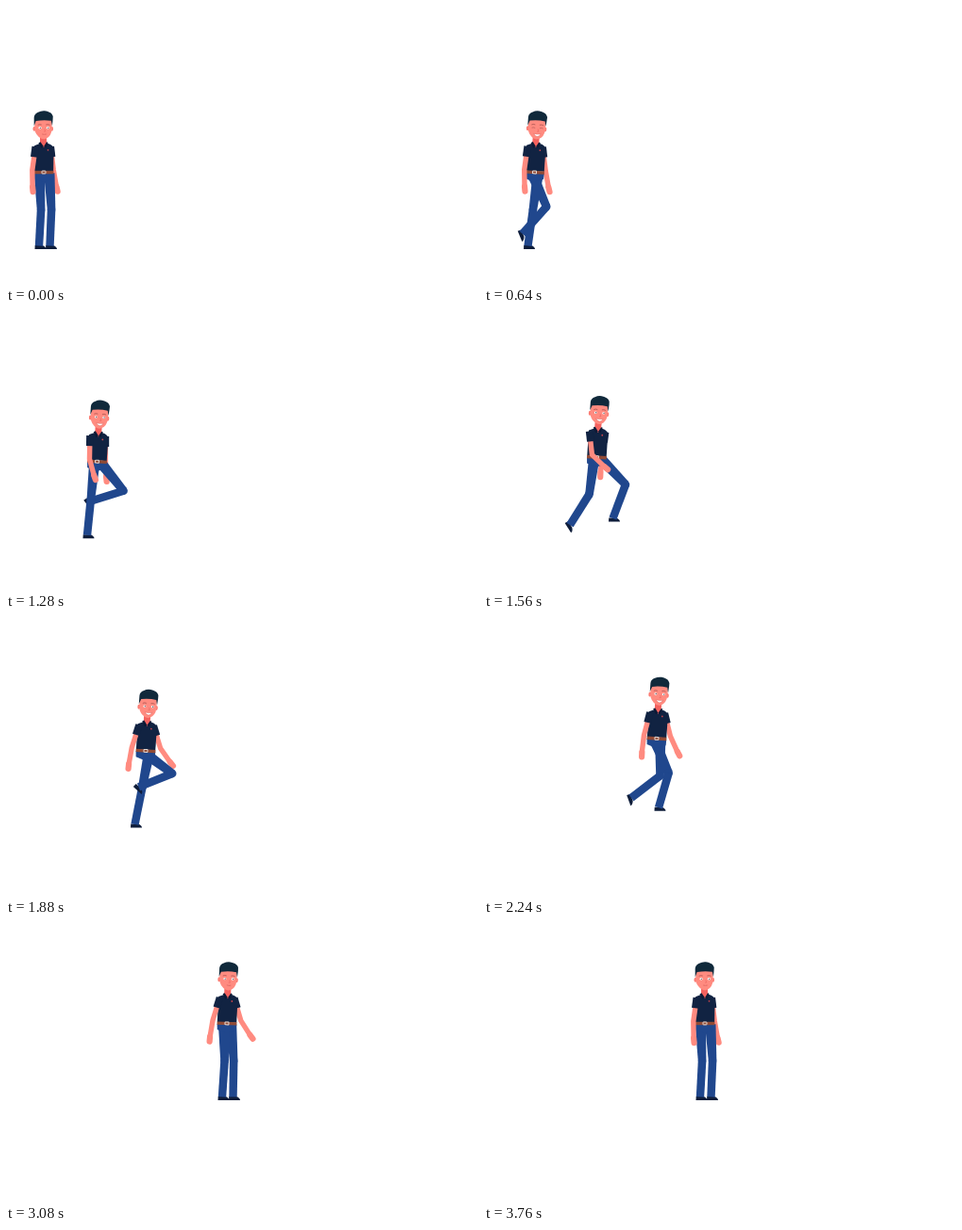
An HTML page for the animation above (3800 ms loop, 500x295 px).

```html
<!DOCTYPE html>
<html lang="en">
<head>
<meta charset="utf-8">
<title>Climbing steps</title>
<style>
  html, body { margin: 0; width: 100%; height: 100%; overflow: hidden; background: #fff; }
  svg { display: block; width: 500px; height: 295px; }
</style>
</head>
<body>
<svg viewBox="0 0 500 295">
  <g id="armR"></g>
  <g id="legR"></g>
  <g id="legL"></g>
  <g id="body">
    <path d="M-10.3 1H10.3L10 7L1.5 10H-1.5L-10 7Z" fill="#20478d"/>
    <path d="M-5 -30L-10 -28L-10.2 -1H10.2L10.5 -25Q10 -29 4 -30.5Z" fill="#112342"/>
    <rect x="-10.4" y="-1.5" width="20.8" height="3.4" fill="#914a35"/>
    <rect x="-2" y="-1.3" width="4" height="2.9" rx=".6" fill="#914a35" stroke="#e3dcd8"/>
    <circle cx="4.5" cy="-23.5" r=".9" fill="#c4434b"/>
    <g id="head">
      <path d="M-4 -38H3V-29.5L0 -26L-4 -30Z" fill="#f4625f"/>
      <path d="M-5.5 -31L-3.5 -32L0 -27L-2.5 -25.5ZM4.5 -31.5L3 -32L0 -27L2.5 -26Z" fill="#0c1a36"/>
      <ellipse cx="-10" cy="-46" rx="1.5" ry="2.5" fill="#fb7b72"/>
      <ellipse cx="8.7" cy="-46" rx="1.3" ry="2.5" fill="#fb7b72"/>
      <path d="M-9.7 -56H8.5V-45Q8 -38 2.5 -35.5Q0 -34.4 -2.5 -35.5Q-9 -39 -9.7 -46Z" fill="#ff8b80"/>
      <path d="M-10.3 -49V-58Q-10 -62 -6 -63.5Q-3 -65.3 1 -65Q7 -64 8.6 -61.5Q10.3 -60 9.6 -56L9 -49L7.8 -54.5Q0 -55.8 -8.3 -54.2Z" fill="#10293b"/>
      <path d="M-6.3 -50Q-4.5 -51.2 -2.3 -50.3M2.3 -50.3Q4.5 -51.2 6.5 -50" fill="none" stroke="#a0504c" stroke-width=".7"/>
      <g id="open">
        <ellipse cx="-4" cy="-47" rx="1.5" ry="1.2" fill="#fff"/>
        <ellipse cx="4.4" cy="-47" rx="1.5" ry="1.2" fill="#fff"/>
        <circle cx="-3.7" cy="-47" r=".65" fill="#4b4650"/>
        <circle cx="4.7" cy="-47" r=".65" fill="#4b4650"/>
      </g>
      <path id="shut" d="M-5.8 -46.8Q-4 -47.6 -2.2 -46.8M2.6 -46.8Q4.4 -47.6 6.2 -46.8" fill="none" stroke="#b85a56" stroke-width=".7"/>
      <path d="M.8 -46L1.7 -43.2H0" fill="none" stroke="#ee6a63" stroke-width=".7"/>
      <path id="mouth" stroke="#de645f" stroke-width=".5" fill="#fff"/>
    </g>
  </g>
  <g id="armL"></g>
</svg>
<script>
const LOOP = 3800, TICK = 40, STRIDE = 560, RISE = 17.75, BONE = 38.5, RAD = Math.PI / 180;
const SKIN = '#ff8b80', SHIRT = '#112342', JEANS = '#20478d', SHOE = '#0e1d3a';
const HOME = { L: 35, R: 46.5 }, GROUND = 254.5;

// [foot, lift time, landing time, landing x]
const steps = [
  ['L', 500, 920, 86], ['R', 860, 1480, 136.5], ['L', 1420, 2040, 185],
  ['R', 1980, 2580, 240.5], ['L', 2520, 3000, 229]
];
// [time, x] of the belt
const walkPath = [[400, 40], [640, 53.5], [1280, 96.5], [1880, 148], [2600, 216], [2960, 234]];

const $ = id => document.getElementById(id);
const f = n => n.toFixed(2);
const pt = p => f(p[0]) + ' ' + f(p[1]);
const mix = (a, b, u) => a + (b - a) * u;
const part = (t, a, b) => Math.min(1, Math.max(0, (t - a) / (b - a)));
const ease = (t, a, b) => { const u = part(t, a, b); return u * u * (3 - 2 * u); };
const polar = (p, len, deg) => [p[0] + len * Math.sin(deg * RAD), p[1] + len * Math.cos(deg * RAD)];

// smooth curve through the path, at rest at both ends
function beltX(t) {
  const last = walkPath.length - 1;
  if (t <= walkPath[0][0]) return walkPath[0][1];
  if (t >= walkPath[last][0]) return walkPath[last][1];
  let i = 0;
  while (walkPath[i + 1][0] <= t) i++;
  const [t0, a] = walkPath[i], [t1, b] = walkPath[i + 1], h = t1 - t0, u = (t - t0) / h;
  const slope = k => k === 0 || k === last ? 0 :
    (walkPath[k + 1][1] - walkPath[k - 1][1]) / (walkPath[k + 1][0] - walkPath[k - 1][0]);
  const m = slope(i) * h, n = slope(i + 1) * h, d = b - a;
  return a + u * (m + u * (3 * d - 2 * m - n + u * (m + n - 2 * d)));
}

function beltY(t) {
  let y = 176.3;
  for (let i = 0; i < 4; i++) y -= RISE * ease(t, 880 + STRIDE * i, 1240 + STRIDE * i);
  return y;
}

// ankle place and shoe tilt: the heel peels off, then the foot swings up and over
function footPose(side, t) {
  let x = HOME[side], y = GROUND, tilt = 0;
  steps.forEach(([foot, lift, land, toX], i) => {
    if (foot !== side || t < lift) return;
    const p = part(t, lift, land), toY = GROUND - RISE * Math.min(i + 1, 4);
    x = mix(x, toX, p * p);
    y = mix(y, toY, p) - 31 * Math.sin(Math.PI * p ** 2.4);
    tilt = 70 * Math.sin(Math.PI * p ** .8);
  });
  return { x, y, tilt };
}

function taper(a, b, wa, wb) {
  const d = Math.hypot(b[0] - a[0], b[1] - a[1]) || 1;
  const n = [(a[1] - b[1]) / d / 2, (b[0] - a[0]) / d / 2];
  const edge = (p, w) => pt([p[0] + n[0] * w, p[1] + n[1] * w]);
  return `<path d="M${edge(a, wa)}L${edge(b, wb)}L${edge(b, -wb)}L${edge(a, -wa)}Z" fill="${JEANS}"/>`;
}

function leg(hip, { x, y, tilt }) {
  const dx = x - hip[0], dy = y - hip[1], dist = Math.hypot(dx, dy);
  const bend = Math.sqrt(Math.max(0, BONE * BONE - dist * dist / 4)) / dist;
  const knee = [hip[0] + dx / 2 + dy * bend, hip[1] + dy / 2 - dx * bend];
  const ankle = [x, y];
  return `<path transform="translate(${pt(ankle)}) rotate(${f(tilt)})" d="M-4.3 -.5H3.5Q7.3 1 7.5 3.5H-4.5Z" fill="${SHOE}"/>` +
    taper(hip, knee, 11.4, 8.6) +
    `<circle cx="${f(knee[0])}" cy="${f(knee[1])}" r="4.3" fill="${JEANS}"/>` +
    taper(knee, ankle, 8.6, 8.4);
}

const line = (pts, width, color, cap = 'round') =>
  `<path d="M${pts.map(pt).join('L')}" fill="none" stroke="${color}" stroke-width="${width}" stroke-linejoin="round" stroke-linecap="${cap}"/>`;

// swing runs from -1 (back) to 1 (forward)
function arm(shoulder, upperRest, foreRest, swing) {
  const upper = upperRest + 16 * swing;
  const fore = foreRest + 18 * swing + 35 * Math.max(0, swing) ** 2;
  const elbow = polar(shoulder, 23, upper), wrist = polar(elbow, 18, fore);
  return line([polar(shoulder, 5, upper), elbow, wrist], 5.4, SKIN) +
    line([wrist, polar(wrist, 5, fore + 4)], 6.2, SKIN) +
    line([polar(shoulder, -2, upper), polar(shoulder, 9, upper)], 7.6, SHIRT, 'butt');
}

function draw(t) {
  const x = beltX(t), y = beltY(t);
  const walk = ease(t, 400, 650) - ease(t, 2900, 3350);
  const tilt = 3.2 * walk, gap = 5 - 2 * walk;
  const swing = walk * Math.cos(Math.PI * (t - 1480) / STRIDE);
  const c = Math.cos(tilt * RAD), s = Math.sin(tilt * RAD);
  const onBody = (px, py) => [x + px * c - py * s, y + px * s + py * c];

  $('armR').innerHTML = arm(onBody(7.5, -25), 7, 10, -swing);
  $('armL').innerHTML = arm(onBody(-9, -25), -8, 1, swing);
  $('legR').innerHTML = leg([x + gap + .8, y + 1.3], footPose('R', t));
  $('legL').innerHTML = leg([x - gap + .3, y + 1.3], footPose('L', t));
  $('body').setAttribute('transform', `translate(${f(x)} ${f(y)}) rotate(${f(tilt)})`);
  $('head').setAttribute('transform', `rotate(${f(tilt * .3)} 0 -30)`);

  const shut = t > 500 && Math.abs((t - 640 + 725) % 1450 - 725) <= 60;
  $('open').style.display = shut ? 'none' : '';
  $('shut').style.display = shut ? '' : 'none';

  const grin = ease(t, 480, 600) - ease(t, 2250, 2450);
  const w = 2.2 + 1.6 * grin, top = -40.3 - .4 * grin;
  $('mouth').setAttribute('d',
    `M${f(.5 - w)} ${f(top)}Q.5 ${f(top + .7)} ${f(.5 + w)} ${f(top)}Q.5 ${f(top + .8 + 5 * grin)} ${f(.5 - w)} ${f(top)}Z`);
}

const start = performance.now();
function tick() {
  const t = (performance.now() - start) % LOOP;
  draw(Math.floor(t / TICK) * TICK);
  requestAnimationFrame(tick);
}
tick();
</script>
</body>
</html>
```
